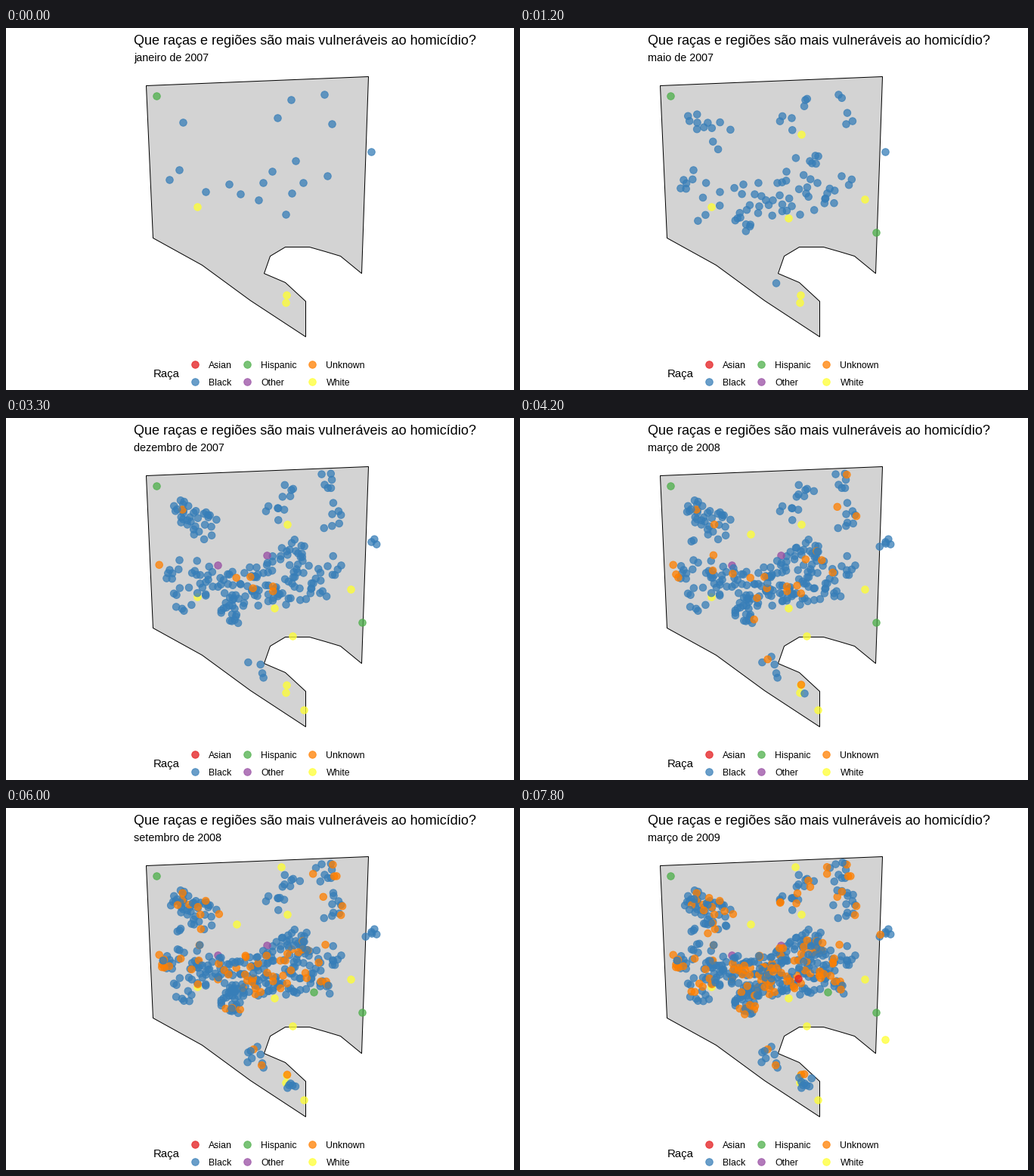
These frames come from a looping animation (672x480 px, 8 s). A matplotlib script:

```python
import matplotlib.pyplot as plt
import numpy as np
from matplotlib.animation import FuncAnimation
from matplotlib.colors import to_rgba

W, H, DPI = 672, 480, 96
PX = 72 / DPI
ALPHA = 0.75
TICK, TICKS_PER_MONTH, TICKS = 100, 3, 80
LAST_MONTH, CASES_PER_MONTH = 26, 19

COLORS = {"Asian": "#E41A1C", "Black": "#377EB8", "Hispanic": "#4DAF4A",
          "Other": "#984EA3", "Unknown": "#FF7F00", "White": "#FFFF33"}
MONTHS = ("janeiro fevereiro março abril maio junho julho agosto "
          "setembro outubro novembro dezembro").split()
BORDER = [(185, 76), (479, 64), (470, 325), (442, 302), (422, 296),
          (401, 290), (369, 290), (349, 302), (341, 325), (369, 337),
          (396, 362), (396, 409), (323, 361), (259, 314), (194, 278)]

# Neighbourhoods: centre, radius and share of the cases.
# The first month has one case at the centre of each of the leading ones.
AREAS = [(230, 189, 30, 5), (235, 126, 18, 4), (265, 218, 22, 9),
         (311, 221, 26, 12), (296, 208, 18, 6), (335, 229, 22, 5),
         (353, 191, 14, 4), (384, 177, 20, 6), (379, 220, 28, 9),
         (394, 206, 26, 10), (426, 197, 18, 4), (371, 248, 20, 2),
         (360, 120, 18, 4), (378, 96, 12, 2), (422, 89, 22, 3),
         (432, 128, 22, 3), (484, 165, 10, 1), (217, 202, 15, 1),
         (341, 206, 14, 3), (262, 142, 22, 11), (302, 257, 18, 10),
         (425, 238, 11, 3), (334, 333, 16, 3), (376, 362, 12, 3),
         (238, 243, 20, 5)]

# Rare cases that stand alone: month, race, place.
RARE = [(0, "Hispanic", (200, 91)), (0, "White", (254, 238)),
        (0, "White", (372, 355)), (0, "White", (371, 365)),
        (2, "White", (457, 228)), (3, "White", (373, 142)),
        (3, "White", (356, 253)), (4, "Hispanic", (472, 272)),
        (6, "Other", (281, 196)), (6, "Other", (346, 183)),
        (6, "White", (380, 290)), (7, "White", (395, 388)),
        (12, "White", (306, 155)), (17, "Hispanic", (408, 245)),
        (20, "White", (365, 79)), (25, "Asian", (369, 227)),
        (25, "White", (484, 308))]


def build_cases():
    """Return months, places and colours, sorted by month."""
    rng = np.random.default_rng(2007)
    share = np.array([area[3] for area in AREAS], float)
    share /= share.sum()
    cases = []
    for k in range(CASES_PER_MONTH * (LAST_MONTH + 1)):
        month = k // CASES_PER_MONTH
        area = k if month == 0 else rng.choice(len(AREAS), p=share)
        x, y, radius, _ = AREAS[area]
        if month > 0:
            r, angle = radius * np.sqrt(rng.random()), 2 * np.pi * rng.random()
            x, y = x + r * np.cos(angle), y + r * np.sin(angle)
        # Unrecorded race becomes common from the second year on.
        unknown = rng.random() < np.clip((month - 8) / 20, 0, 0.5)
        cases.append((month, "Unknown" if unknown else "Black", (x, y)))
    cases = sorted(cases + RARE, key=lambda case: case[0])
    months, races, places = zip(*cases)
    colors = [to_rgba(COLORS[race], ALPHA) for race in races]
    return np.array(months), np.array(places) - 0.5, np.array(colors)


def dots(places, colors):
    return ax.scatter(*np.transpose(places), s=(9.5 * PX) ** 2, c=colors,
                      edgecolors=colors, linewidths=PX, zorder=2)


def label(x, baseline, text, size):
    return ax.text(x, baseline, text, size=size * PX, va="baseline", zorder=3)


plt.rcParams["font.family"] = "Liberation Sans"
fig = plt.figure(figsize=(W / DPI, H / DPI), dpi=DPI, facecolor="white")
ax = fig.add_axes([0, 0, 1, 1])
ax.set(xlim=(0, W), ylim=(H, 0))
ax.axis("off")

ax.add_patch(plt.Polygon(np.array(BORDER) + 0.5, facecolor="lightgray",
                         edgecolor="black", linewidth=PX, zorder=1))
label(169, 22, "Que raças e regiões são mais vulneráveis ao homicídio?", 18)
subtitle = label(169, 44, "", 14.4)
label(195, 463, "Raça", 15)
for i, (race, color) in enumerate(COLORS.items()):
    x, y = (250, 319, 405.5)[i // 2], 446 + 23 * (i % 2)
    dots([(x - 0.5, y - 0.5)], [to_rgba(color, ALPHA)])
    label(x + 18, y + 5, race, 12.3)

born, places, colors = build_cases()
cases = dots(places, colors)


def update(tick):
    month = min(tick // TICKS_PER_MONTH, LAST_MONTH)
    shown = np.searchsorted(born, month, side="right")
    cases.set_offsets(places[:shown])
    cases.set_facecolor(colors[:shown])
    cases.set_edgecolor(colors[:shown])
    subtitle.set_text(f"{MONTHS[month % 12]} de {2007 + month // 12}")
    return cases, subtitle


animation = FuncAnimation(fig, update, frames=TICKS, interval=TICK,
                          repeat=True, repeat_delay=0)
plt.show()
```
